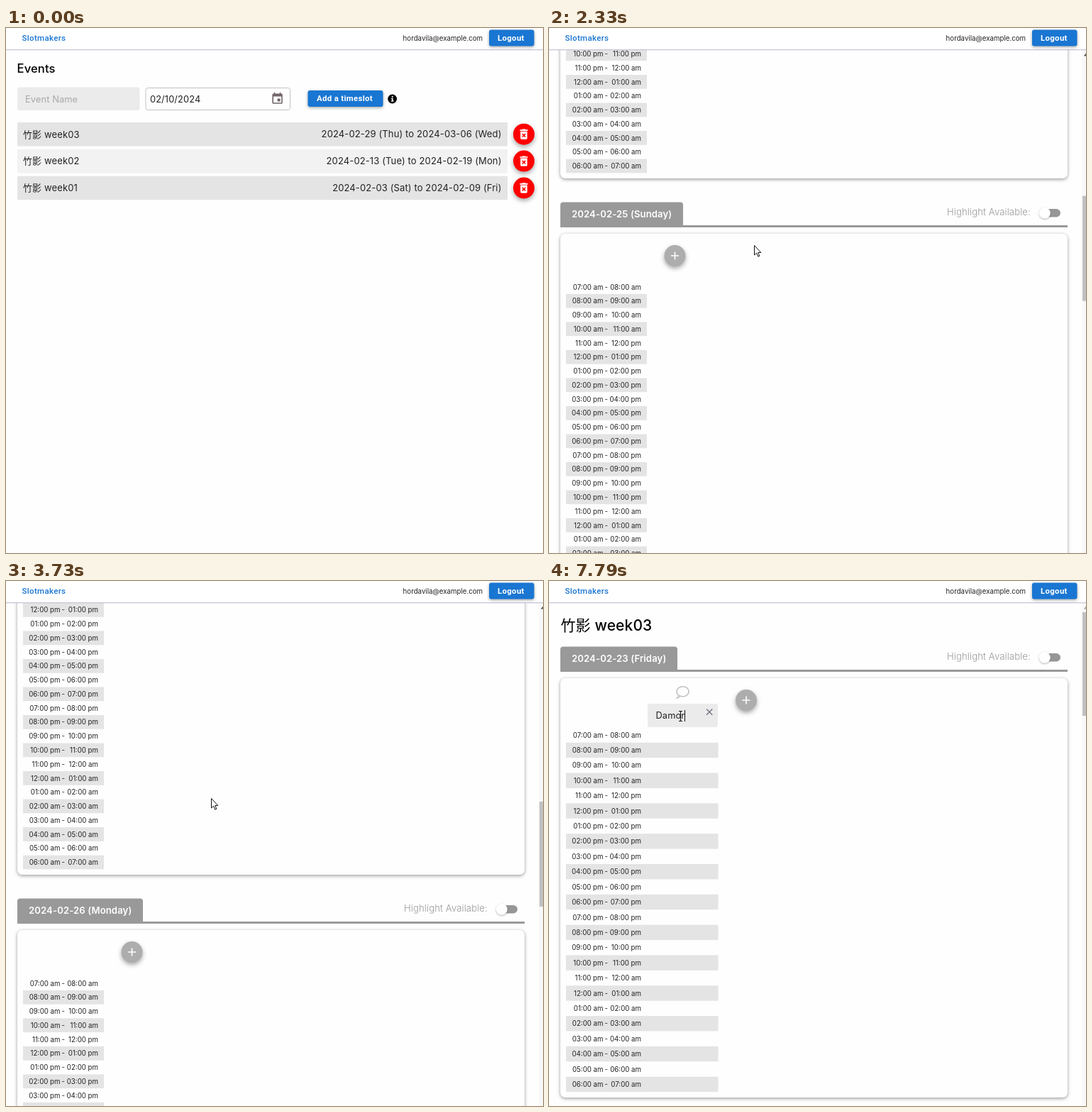
These frames come from a looping animation (757x740 px, 8 s). An HTML page with a canvas:

```html
<!DOCTYPE html>
<html lang="zh-Hant">
<head>
<meta charset="utf-8">
<title>Slotmakers</title>
<style>
html, body { margin: 0; width: 100%; height: 100%; overflow: hidden; background: #fefefe; }
canvas { display: block; }
</style>
</head>
<body>
<canvas id="stage" width="757" height="740"></canvas>
<script>
const ctx = document.getElementById('stage').getContext('2d');
const LOOP = 8000;
const INTER = 'Inter, "Noto Sans CJK TC", "Noto Sans CJK", sans-serif';
const ROBOTO = 'Roboto, sans-serif';
const SYSTEM = '"Liberation Sans", "Noto Sans CJK TC", "Noto Sans CJK", sans-serif';
const BLUE = '#1976d2';
const GREY = '#999';
const TYPED = 'Damor';
const KEY_TIMES = [6890, 7330, 7450, 7620, 7790];
const EVENT = '竹影 week03';

const TRASH = new Path2D('M6 19c0 1.1.9 2 2 2h8c1.1 0 2-.9 2-2V7H6v12zm2.46-7.12l1.41-1.41L12 12.59l2.12-2.12 1.41 1.41L13.41 14l2.12 2.12-1.41 1.41L12 15.41l-2.12 2.12-1.41-1.41L10.59 14l-2.13-2.12zM15.5 4l-1-1h-5l-1 1H5v2h14V4z');
const CALENDAR = new Path2D('M17 12h-5v5h5v-5zM16 1v2H8V1H6v2H5c-1.11 0-1.99.9-1.99 2L3 19c0 1.1.89 2 2 2h14c1.1 0 2-.9 2-2V5c0-1.1-.9-2-2-2h-1V1h-2zm3 18H5V8h14v11z');
const PLUS = new Path2D('M19 13h-6v6h-2v-6H5v-2h6V5h2v6h6v2z');
const ARROW = new Path2D('M.5 .5V14L3.6 11.2 5.8 16.2 7.8 15.3 5.7 10.5H9.8Z');

// Progress in n equal jumps, the first at a and the last at b
function steps(t, a, b, n) {
  if (t < a) return 0;
  return Math.min(1, (Math.floor((t - a) / ((b - a) / (n - 1)) + 0.001) + 1) / n);
}
const smooth = p => p * p * (3 - 2 * p);

function text(str, x, y, size, color, { weight = 400, family = INTER, align = 'left', gap = 0.12 } = {}) {
  ctx.font = `${weight} ${size}px ${family}`;
  ctx.letterSpacing = gap + 'px';
  ctx.textAlign = align;
  ctx.fillStyle = color;
  ctx.fillText(str, x, y);
}

function shadow(blur, dy, alpha) {
  ctx.shadowColor = `rgba(0,0,0,${alpha})`;
  ctx.shadowBlur = blur;
  ctx.shadowOffsetY = dy;
}
const noShadow = () => shadow(0, 0, 0);

function box(x, y, w, h, r, fill) {
  ctx.beginPath();
  ctx.roundRect(x, y, w, h, r);
  ctx.fillStyle = fill;
  ctx.fill();
}

function disc(x, y, r, fill) {
  ctx.beginPath();
  ctx.arc(x, y, r, 0, 7);
  ctx.fillStyle = fill;
  ctx.fill();
}

function icon(path, x, y, fill) {
  ctx.save();
  ctx.translate(x, y);
  ctx.scale(0.8, 0.8);
  ctx.fillStyle = fill;
  ctx.fill(path);
  ctx.restore();
}

function button(label, x, y, w, h, tx, ty) {
  shadow(4, 1.5, 0.35);
  box(x, y, w, h, 3, BLUE);
  noShadow();
  text(label, tx, ty, 11.4, '#fff', { weight: 600, family: ROBOTO, gap: 0.33 });
}

function roundButton(x, y, fill, path) {
  shadow(6, 3, 0.35);
  disc(x, y, 15, fill);
  noShadow();
  icon(path, x - 9.6, y - 9.6, '#fff');
}

function header() {
  ctx.fillStyle = '#fff';
  ctx.fillRect(0, 0, 757, 30);
  ctx.fillStyle = '#c6c8d8';
  ctx.fillRect(0, 30, 757, 1.3);
  text('Slotmakers', 22.5, 17.5, 11.5, BLUE, { weight: 500, family: ROBOTO, gap: 0.33 });
  text('hordavila@example.com', 672, 18, 9.7, '#222', { align: 'right', gap: 0 });
  button('Logout', 681, 2.5, 63.5, 23, 693, 17.5);
}

function listPage() {
  text('Events', 15.5, 62.8, 16.6, '#000', { weight: 500 });
  box(16, 83.5, 172.5, 32.5, 3, '#ebebeb');
  text('Event Name', 27, 104.5, 12.8, '#a8a8a8');
  ctx.beginPath();
  ctx.roundRect(197, 84.5, 203.5, 31, 3);
  ctx.strokeStyle = '#c2c2c2';
  ctx.lineWidth = 1;
  ctx.stroke();
  text('02/10/2024', 203, 104.5, 12.8, '#222');
  icon(CALENDAR, 373, 90, '#71656b');
  button('Add a timeslot', 425.5, 88, 106, 23, 438, 103);
  disc(544.6, 100, 6.4, '#000');
  ctx.fillStyle = '#fff';
  ctx.fillRect(543.8, 96, 1.8, 1.8);
  ctx.fillRect(543.8, 98.8, 1.8, 4.6);
  ctx.fillRect(542.8, 98.8, 1.6, 1);
  ctx.fillRect(542.6, 102.6, 4.2, 1);
  const spans = [
    '2024-02-29 (Thu) to 2024-03-06 (Wed)',
    '2024-02-13 (Tue) to 2024-02-19 (Mon)',
    '2024-02-03 (Sat) to 2024-02-09 (Fri)'
  ];
  spans.forEach((span, i) => {
    const y = 149.7 + i * 37.9;
    box(16, y - 16.7, 691, 33.5, 1, i % 2 ? '#f2f2f2' : '#e4e4e4');
    text('竹影 week0' + (3 - i), 24, y + 4.8, 13, '#222');
    text(span, 698.5, y + 4.6, 13, '#222', { align: 'right' });
    roundButton(730, y, '#f00', TRASH);
  });
}

function clock(hour) {
  const h = hour % 24;
  return String(h % 12 || 12).padStart(2, '0') + ':00 ' + (h < 12 ? 'am' : 'pm');
}

function hours(first, pitch, right) {
  const opt = { align: 'right', gap: 0 };
  for (let i = 0; i < 24; i++) {
    const y = first + i * pitch;
    if (i % 2) {
      ctx.fillStyle = '#e4e4e4';
      ctx.fillRect(24, y - pitch / 2, right - 24, pitch);
    }
    text(clock(7 + i), 76.5, y + 3.6, 9.7, '#222', opt);
    text('-', 83, y + 3.6, 9.7, '#222', opt);
    text(clock(8 + i), 130, y + 3.6, 9.7, '#222', opt);
  }
}

function nameColumn(t) {
  ctx.strokeStyle = '#c4c4c4';
  ctx.lineWidth = 1.6;
  ctx.beginPath();
  ctx.ellipse(188.5, 155.8, 8.6, 7, 0, 2.05, 2.6 + Math.PI * 2 - 0.02);
  ctx.quadraticCurveTo(182.5, 163, 180, 165);
  ctx.quadraticCurveTo(183, 165, 184.5, 162);
  ctx.stroke();

  box(139, 173, 99, 33, 3, '#ebebeb');
  const count = KEY_TIMES.filter(k => t >= k).length;
  const value = TYPED.slice(0, count);
  if (count) text(value, 150.5, 194.3, 12.8, '#222');
  else text('Name', 150.5, 194.3, 12.8, '#a6a6a6');

  ctx.strokeStyle = '#6f6f80';
  ctx.lineWidth = 1.3;
  ctx.beginPath();
  ctx.moveTo(222, 180.5); ctx.lineTo(230.3, 188.7);
  ctx.moveTo(230.3, 180.5); ctx.lineTo(222, 188.7);
  ctx.stroke();

  if (t >= 5830 && !(t >= 6450 && t < 6890)) {
    const w = count ? ctx.measureText(value).width : 0;
    ctx.fillStyle = '#111';
    ctx.fillRect(Math.round(150 + w), 182, 1, 16);
  }
}

function day(i, open, t) {
  const dates = ['23 (Friday)', '24 (Saturday)', '25 (Sunday)', '26 (Monday)', '27 (Tuesday)'];
  const tabs = [165, 183, 173, 177, 179];
  box(16, 92.5, tabs[i], 35, [4, 4, 0, 0], GREY);
  ctx.fillRect(16, 125, 715, 3);
  text('2024-02-' + dates[i], 32, 113.6, 13.1, '#fff', { weight: 600 });
  text('Highlight Available:', 561, 111.2, 13.1, '#999', { weight: 300 });
  box(697, 102, 24, 11.5, 6, '#969696');
  shadow(2.5, 1, 0.3);
  disc(698.8, 107.8, 8, '#fff');
  shadow(5, 1.5, 0.4);
  box(16, 137, 715, open ? 591 : 547, 7, '#fefefe');
  noShadow();
  if (open) {
    hours(217, 21.41, 238.5);
    nameColumn(t);
  } else {
    hours(212, 19.76, 138);
  }
  roundButton(open ? 278 : 177.5, 168, '#adadad', PLUS);
}

function scrollAt(t) {
  const down = 1097 * smooth(steps(t, 1640, 2330, 12));
  const more = 763 * smooth(steps(t, 2550, 3170, 12));
  return (down + more) * (1 - smooth(steps(t, 3570, 4140, 11)));
}

function eventPage(t) {
  const scroll = Math.round(scrollAt(t));
  const open = t >= 5340;
  ctx.save();
  ctx.beginPath();
  ctx.rect(0, 31, 751, 709);
  ctx.clip();
  ctx.translate(0, -scroll);
  text(EVENT, 16.5, 69.6, 21, '#000', { weight: 500 });
  for (let i = 0; i < 5; i++) {
    const y = i * 625 + (open && i ? 44 : 0);
    if (y - scroll > 680 || y - scroll < -700) continue;
    ctx.save();
    ctx.translate(0, y);
    day(i, open && !i, t);
    ctx.restore();
  }
  ctx.restore();

  ctx.fillStyle = '#f8f8f8';
  ctx.fillRect(751, 31, 6, 709);
  ctx.fillStyle = '#c1c1c1';
  ctx.fillRect(752, 44 + scroll * 0.1756, 5, open ? 146 : 148);
  ctx.fillStyle = scroll ? '#505050' : '#a3a3a3';
  ctx.beginPath();
  ctx.moveTo(757, 35.5); ctx.lineTo(757, 39.5); ctx.lineTo(753.8, 39.5);
  ctx.fill();
}

function suggestions(t) {
  const alpha = steps(t, 5830, 5950, 3) * (1 - steps(t, 6890, 7050, 4));
  if (!alpha) return;
  ctx.globalAlpha = alpha;
  shadow(5, 1, 0.3);
  box(170, 213, 129, 155, 5, '#fff');
  noShadow();
  [EVENT, '格子', '竹影 week02', '週末茶聚組', '竹影 week01'].forEach((s, i) =>
    text(s, 180.5, 235.3 + i * 29.65, 10.6, '#222', { family: SYSTEM, gap: 0 }));
  ctx.globalAlpha = 1;
}

// Moves: start, end, jumps, x, y
const MOVES = [
  [100, 560, 9, 450, 150],
  [620, 850, 5, 443, 217],
  [910, 970, 2, 424, 227],
  [1180, 1530, 7, 290, 305],
  [1640, 1700, 2, 289, 306],
  [4360, 4820, 9, 209, 198],
  [4980, 5160, 4, 179, 171],
  [5400, 5780, 7, 185, 190]
];

function cursor(t) {
  if (t < 100) return;
  let x = 470, y = 740;
  for (const [a, b, n, tx, ty] of MOVES) {
    const p = smooth(steps(t, a, b, n));
    x += (tx - x) * p;
    y += (ty - y) * p;
  }
  x = Math.round(x);
  y = Math.round(y);
  ctx.save();
  ctx.translate(x, y);
  if (t >= 5340 && y > 173) {
    ctx.strokeStyle = '#111';
    ctx.lineWidth = 1;
    ctx.beginPath();
    for (const s of [-6, 8]) {
      ctx.moveTo(-2, s - 0.5); ctx.lineTo(3, s - 0.5);
    }
    ctx.moveTo(0.5, -6); ctx.lineTo(0.5, 8);
    ctx.stroke();
  } else {
    ctx.fillStyle = '#fff';
    ctx.fill(ARROW);
    ctx.strokeStyle = '#111';
    ctx.lineWidth = 1;
    ctx.stroke(ARROW);
  }
  ctx.restore();
}

function draw(now) {
  const t = now % LOOP;
  ctx.fillStyle = '#fefefe';
  ctx.fillRect(0, 0, 757, 740);
  if (t < 620) listPage();
  else eventPage(t);
  header();
  suggestions(t);
  cursor(t);
}

let start;
function tick(now) {
  start ??= now;
  draw(now - start);
  requestAnimationFrame(tick);
}
draw(0);
requestAnimationFrame(tick);
</script>
</body>
</html>
```
